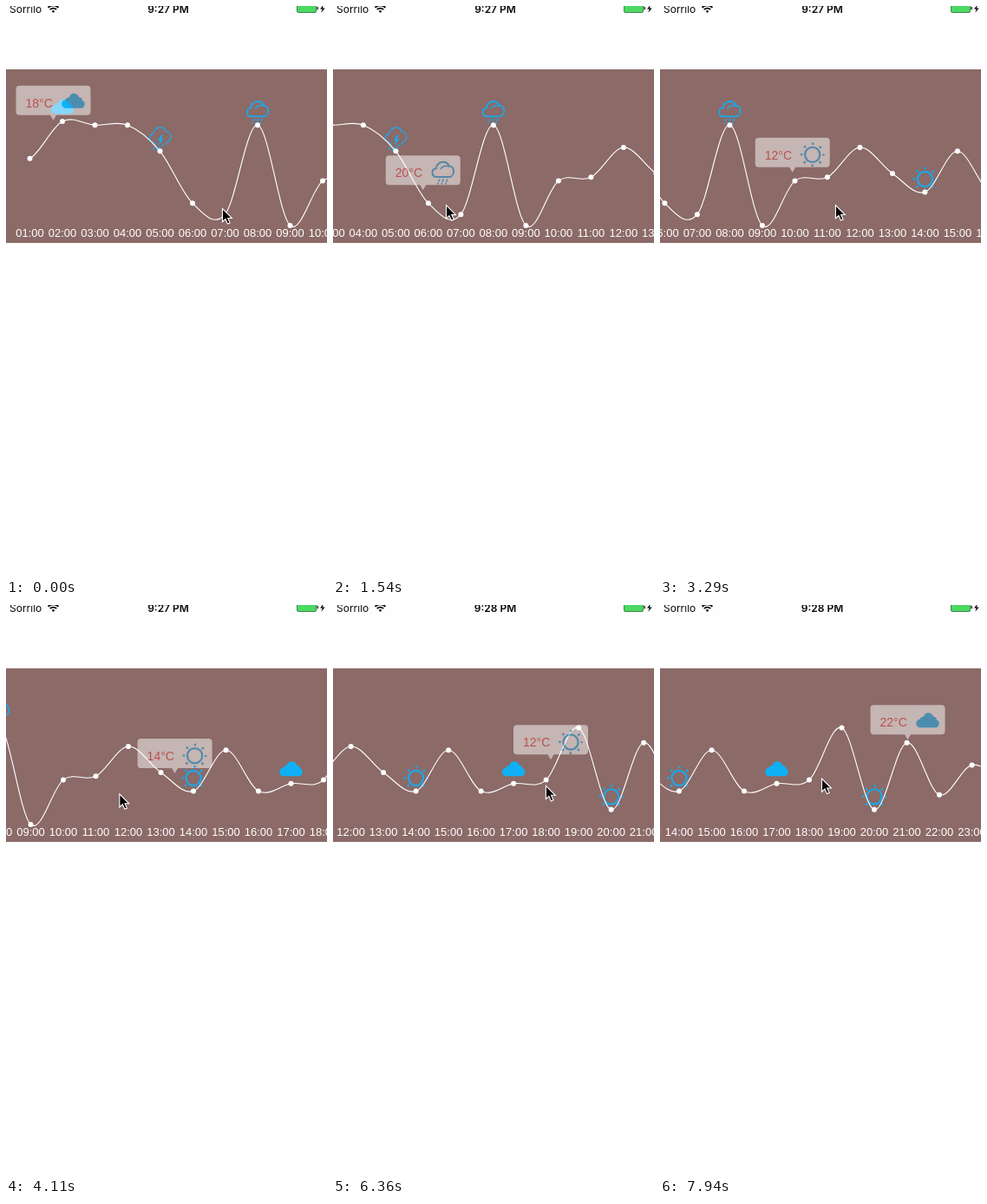
These frames come from a looping animation (370x658 px, 7990 ms). An HTML page:

```html
<!DOCTYPE html>
<html lang="en">
<head>
<meta charset="utf-8">
<title>Hourly weather</title>
<style>
  html, body { margin: 0; width: 100%; height: 100%; overflow: hidden; background: #fefefe; }
  svg { display: block; width: 100%; height: 100%; }
  .status { font: 12px Inter, Roboto, sans-serif; fill: #0a0a0a; }
  .clock { font-weight: 600; text-anchor: middle; }
  .hour { font: 13px "Liberation Sans", Arial, sans-serif; fill: #fff; text-anchor: middle; }
  .temp { font: 14px "Liberation Sans", Arial, sans-serif; fill: #e63c3a; }
</style>
</head>
<body>
<svg viewBox="0 0 370 658">
  <defs>
    <clipPath id="clip"><rect y="73" width="370" height="200"/></clipPath>
    <g id="cloud" fill="#0fb0f5">
      <path d="M-8 6.500C-11 6.500-13.200 4.500-13.200 1.600C-13.200-1-11.500-3-8.800-3.300C-8.500-5.500-6.500-6.300-5-5.800C-4-9-1.500-10.700 1-10.500C4-10.300 6-8.500 6.600-6C9-6.200 10.300-4.500 10.300-2.600C12.200-2 13.200-.3 13.200 1.600C13.200 4.600 11 6.500 8.500 6.500Z"/>
    </g>
    <path id="outline" d="M-7.500 4.600C-10.500 4.300-12.200 2.300-12.200 0C-12.200-2.800-10.200-4.500-7.800-4.700C-7.400-9-4-12.300 0-12.300C3.500-12.300 6-10.400 6.900-7.500C10-7.400 12.300-5 12.300-1.700C12.300 1.700 10.300 4.200 7.500 4.600"/>
    <g id="rain" fill="none" stroke="#22a4e2" stroke-width="2" stroke-linecap="round">
      <path d="M-7 5C-10.500 5-12.200 2.800-12.200 0C-12.200-2.800-10.200-4.700-7.800-4.900C-7.400-9.300-4-12.200 0-12.200C3.500-12.200 6-10.400 6.900-7.500C10-7.400 12.300-5 12.300-1.600C12.300 2.200 10 5 7 5Z"/>
      <path d="M-2.500-4.500C-1-7.300 3-8.300 6.500-7.300" stroke-width="1.500"/>
      <path d="M-4 8l-.9 2M.5 8l-.9 2M5 8l-.9 2M-5.500 12l-.6 1M-1 12l-.6 1M3.500 12l-.6 1" stroke-width="1.500"/>
    </g>
    <g id="storm" fill="none" stroke="#22a4e2" stroke-width="1.500" stroke-linecap="round">
      <use href="#outline"/>
      <path d="M1.800-4l-4.500 6.500h2.800l-2 6.500l6-8h-3l2.500-5z" fill="#12aef2" stroke="none"/>
      <path d="M-5 6l-1 2M-7 10.500l-.8 1.700M-1 10.500l-1 2M3.500 7.500l-1 2M1.500 12.500l-.6 1.200M-4 13l-.4.800M7 5.800l-.6 1.300" stroke-width="1.700"/>
    </g>
    <g id="sun" fill="none" stroke="#1aa8ea">
      <circle r="8.600" stroke-width="2.200"/>
      <circle r="12.600" stroke-width="2.600" stroke-dasharray="2.400 7.496" stroke-dashoffset="1.200"/>
    </g>
  </defs>

  <rect width="370" height="658" fill="#fefefe"/>
  <g class="status">
    <text x="4" y="7.500">Sorrilo</text>
    <text id="clock" class="clock" x="187" y="7.500"></text>
    <g fill="none" stroke="#0a0a0a" stroke-width="1.900">
      <path d="M48.600 1.800a8.300 8.300 0 0 1 11.800 0M50.800 4.200a5.200 5.200 0 0 1 7.400 0"/>
      <path d="M52.700 5.900a2.700 2.700 0 0 1 3.600 0l-1.800 2z" fill="#0a0a0a" stroke="none"/>
    </g>
    <rect x="335.500" y="-2.500" width="22" height="10" rx="1.500" fill="#4bd964" stroke="#2c6b38" stroke-width=".8"/>
    <path d="M358.500 1h1.300v3.200h-1.300zM366-1.500l-4 5h2.600l-1.300 4.300l4.400-5.300h-2.700z"/>
  </g>

  <g clip-path="url(#clip)">
    <g id="content">
      <rect y="73" width="920" height="200" fill="#8b6a67"/>
      <g id="icons"></g>
      <path id="line" fill="none" stroke="#fff" stroke-width="1.100"/>
      <g id="dots" fill="#fff"></g>
      <g id="hours"></g>
    </g>
    <g id="bubble" opacity=".5">
      <path d="M4 0H82a4 4 0 0 1 4 4V30a4 4 0 0 1-4 4H46.500L43 40L39.500 34H4a4 4 0 0 1-4-4V4a4 4 0 0 1 4-4z" fill="#fff"/>
      <text id="temp" class="temp" x="11" y="25"></text>
      <use id="badge" x="66" y="19.700"/>
    </g>
  </g>
  <path id="cursor" d="M0 0V15.200L3.500 12L6 17.600L8.600 16.400L6.200 11H10.900Z" fill="#000" stroke="#fff" stroke-width="1.100"/>
</svg>

<script>
const LOOP = 7990, STEP = 37.5, LEFT = 27.5;
const temps = [18, 28, 27, 27, 20, 6, 3, 27, 0, 12, 13, 21,
               14, 9, 20, 9, 11, 12, 26, 4, 22, 8, 16, 12];
const icons = { 1: 'cloud', 4: 'storm', 7: 'rain', 13: 'sun', 16: 'cloud', 19: 'sun', 23: 'cloud' };

// [ms, value...] keys
const scrollKeys = [[50, 0], [830, 47.5], [1660, 115], [2170, 157], [2500, 161], [3290, 209.5],
  [4140, 301], [4650, 325.5], [5610, 325.5], [6420, 429], [6990, 549.5], [7230, 562], [7460, 549], [7940, 493]];
const cursorKeys = [[50, 249.5, 233.5], [830, 199.5, 234.5], [2170, 93.5, 225.5], [2500, 249, 230],
  [3290, 202.5, 229.5], [4000, 125, 220], [4600, 190, 208], [4950, 190, 208], [5280, 353, 170],
  [5600, 380, 233], [5640, 369.5, 233], [6420, 236, 206], [6700, 194, 195], [6990, 193.5, 195],
  [7300, 140, 198], [7940, 186.5, 200]];

const $ = id => document.getElementById(id);
const xOf = i => LEFT + STEP * i;
const yOf = i => 253 - 30 / 7 * temps[i];
const clamp = (v, lo, hi) => Math.max(lo, Math.min(hi, v));

function add(parent, tag, attrs, text) {
  const el = document.createElementNS('http://www.w3.org/2000/svg', tag);
  for (const k in attrs) el.setAttribute(k, attrs[k]);
  if (text) el.textContent = text;
  $(parent).append(el);
}

// Monotone cubic through the keys
function sample(keys, t, c = 1) {
  const n = keys.length - 1;
  if (t <= keys[0][0]) return keys[0][c];
  if (t >= keys[n][0]) return keys[n][c];
  const k = keys.findIndex(key => key[0] > t) - 1;
  const slope = i => (keys[i + 1][c] - keys[i][c]) / (keys[i + 1][0] - keys[i][0]);
  const tangent = i => {
    if (i === 0) return slope(0);
    if (i === n) return slope(n - 1);
    const a = slope(i - 1), b = slope(i);
    return a * b <= 0 ? 0 : 2 * a * b / (a + b);
  };
  const [a, b] = [keys[k], keys[k + 1]];
  const w = b[0] - a[0], u = (t - a[0]) / w, v = 1 - u;
  return a[c] * v * v * (1 + 2 * u) + b[c] * u * u * (3 - 2 * u)
    + w * u * v * (tangent(k) * v - tangent(k + 1) * u);
}

function build() {
  const last = temps.length - 1;
  const tangent = i => (yOf(Math.min(i + 1, last)) - yOf(Math.max(i - 1, 0))) / 6;
  let d = `M${xOf(0)} ${yOf(0)}`;
  temps.forEach((_, i) => {
    const x = xOf(i), y = yOf(i);
    if (i) d += `C${x - STEP * 2 / 3} ${yOf(i - 1) + tangent(i - 1)} ${x - STEP / 3} ${y - tangent(i)} ${x} ${y}`;
    if (icons[i]) add('icons', 'use', { href: '#' + icons[i], x, y: y - 15 });
    add('dots', 'circle', { cx: x, cy: y, r: 3 });
    add('hours', 'text', { class: 'hour', x, y: 266 }, String(i + 1).padStart(2, '0') + ':00');
  });
  $('line').setAttribute('d', d);
}

const move = (id, x, y) => $(id).setAttribute('transform', `translate(${x.toFixed(2)} ${y.toFixed(2)})`);

function draw(t) {
  const scroll = sample(scrollKeys, t);
  move('content', -scroll, 0);

  // The bubble slides along straight lines between the points
  const pos = clamp(0.8 + scroll * 0.03916, 0, 22.999);
  const i = Math.floor(pos);
  const y = yOf(i) + (yOf(i + 1) - yOf(i)) * (pos - i);
  move('bubble', 11.5 + scroll * 0.4686, y - 49.9);
  const next = Object.keys(icons).find(k => k > i);
  $('temp').textContent = temps[i] + '°C';
  $('badge').setAttribute('href', '#' + icons[next]);

  move('cursor', sample(cursorKeys, t, 1), sample(cursorKeys, t, 2));
  $('cursor').style.display = t >= 5285 && t < 5635 ? 'none' : '';
  $('clock').textContent = t < 5100 ? '9:27 PM' : '9:28 PM';
}

build();
const start = performance.now();
function tick() {
  draw((performance.now() - start) % LOOP);
  requestAnimationFrame(tick);
}
tick();
</script>
</body>
</html>
```
